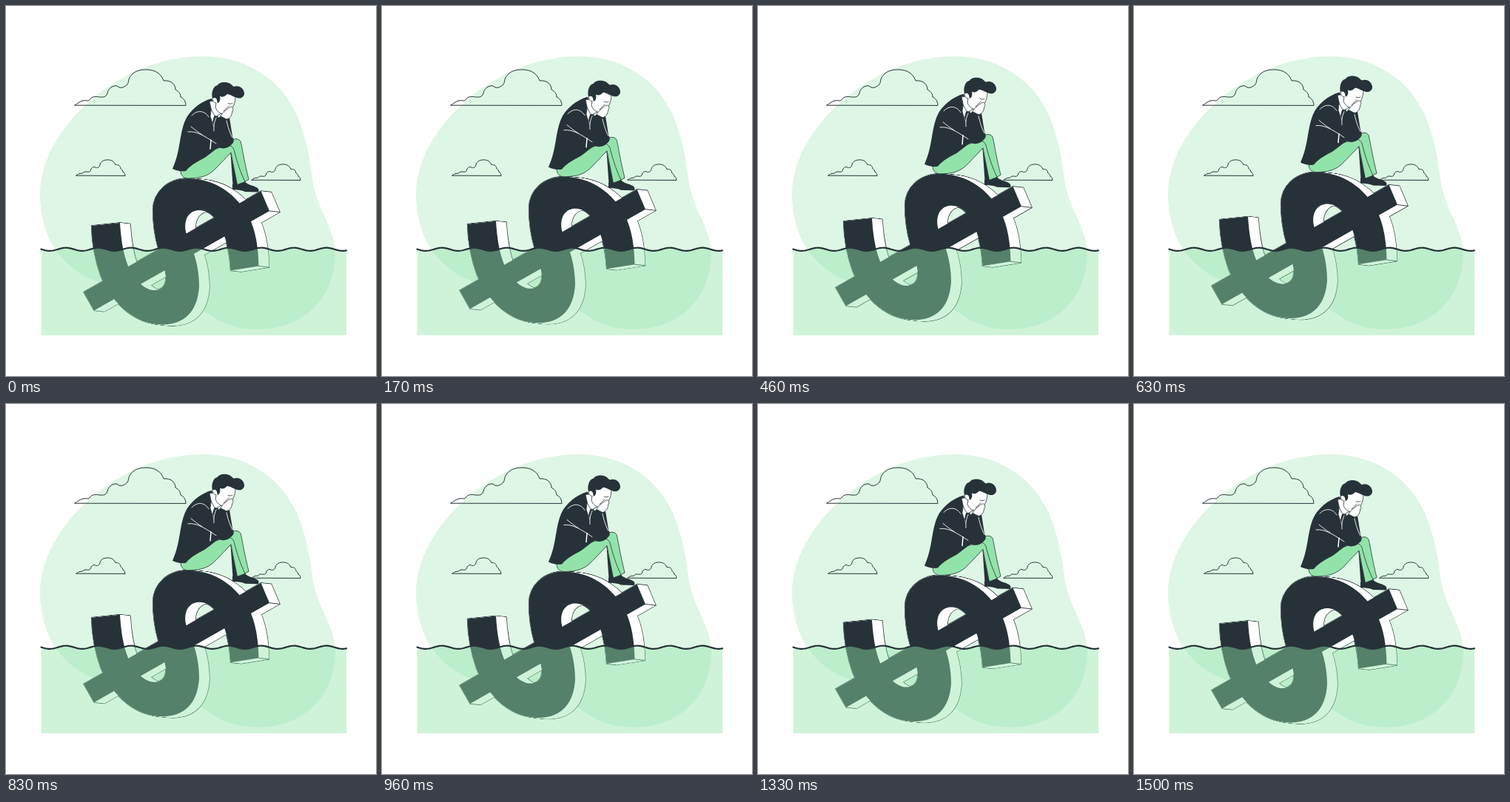
These frames come from a looping animation (500x500 px, 1.54 s). An HTML page:

```html
<!DOCTYPE html>
<html lang="en">
<head>
<meta charset="utf-8">
<title>Sinking dollar</title>
<style>
html, body { margin: 0; width: 100%; height: 100%; overflow: hidden; background: #fff; }
svg { display: block; width: 100vw; height: 100vh; }
.line { fill: none; stroke: #263238; stroke-linecap: round; stroke-linejoin: round; }
.pale { fill: none; stroke: #fff; stroke-linecap: round; stroke-linejoin: round; }
.dark { fill: #263238; }
.skin { fill: #fff; stroke: #263238; stroke-width: .8; stroke-linejoin: round; }
.cloth { fill: #92e3a9; stroke: #263238; stroke-width: .8; stroke-linejoin: round; }
</style>
</head>
<body>
<svg viewBox="0 0 500 500">
  <defs>
    <path id="cloud" vector-effect="non-scaling-stroke" d="M0 0C4 -2 6 -5 11 -6C15 -7 18 -5 20 -7C22 -12 29 -12 33 -11C38 -11 42 -10 44 -16C45 -23 52 -27 57 -26C62 -21 68 -25 71 -28C73 -31 72 -36 76 -40C81 -47 90 -48 97 -48C109 -48 117 -42 120 -33C129 -34 136 -29 136 -21C141 -18 143 -15 143 -11C148 -9 150 -4 150 0Z"/>
    <g id="dollar">
      <path d="M115.500 297L154 293C156 324 161 350 174 367C184 380 194 385 203 384C216 382 218 370 214 356C211 344 208 337 206 329C201 312 198.500 294 198.500 275C199 252 218 233 245 233C283 233 312 255 328 285C338 304 341 328 341.500 351.500L303.500 357.500C302 333 298 311 286 292C279 281 270 275.500 260 276C246 277 240 290 243 305C245 315 250 324 254 335C259 350 261 365 261 379C259 412 242 430 212 430.500C176 430.500 145 405 128 365C119 340 116 318 115.500 297Z"/>
      <path d="M104.800 386.500L344.500 250L356 277L119 411.500Z"/>
    </g>
  </defs>

  <path fill="#def6e5" d="M264 68C196 69 139 101 98 143C63 179 46 220 46 255C47 302 64 341 106 365C149 387 211 379 252 402C280 419 295 437 341 437C403 437 445 394 445 334C445 301 421 276 415 239C409 196 403 162 384 131C360 92 318 68 264 68Z"/>
  <g class="line" stroke-width="1">
    <use href="#cloud" transform="translate(93 134)"/>
    <use href="#cloud" transform="translate(95 229) scale(.44)"/>
    <use href="#cloud" transform="translate(332 235) scale(.44)"/>
  </g>

  <g id="float">
    <g id="edge" fill="#263238" stroke="#263238" stroke-width="1.300" stroke-linejoin="round"></g>
    <g id="side" fill="#fff"></g>
    <path class="line" stroke-width=".9" d="M356 277L370 278.500M341.500 351.500L355.500 353"/>
    <use href="#dollar" class="dark"/>

    <path class="dark" d="M306 241L323 237C326 242 334 242 340 246C342 248 342 251 340 251.500L323 251C317 248 312 249 306 248Z"/>
    <path class="dark" d="M303.500 199L313 241L306.500 242Z"/>
    <path class="cloth" d="M302 184C306 179 314 178 317 183C319 190 321 206 328 234.500L319 239C310 220 305 205 302 193Z"/>
    <path class="cloth" d="M236 222C236 228 239 233 246 233C262 233 274 230 284 219L304 198L312.500 241.500L323 237.500C317 225 313 213 309 198C308 191 304 187 297 189C281 193 261 202 247 209Z"/>

    <path class="dark" d="M278 125C263 129 248 141 242 155C234 174 236 196 225 220C231 223 238 224 243 223C250 214 262 209 270 204C277 199 282 194 288 191C293 194 301 192 305 187C309 184 308 180 306 176L302 151L294 146L287 151Z"/>
    <path class="skin" d="M275 129L283 128L291 145L280 152Z"/>
    <path class="skin" d="M277 140L283 150L281 165L276 149Z"/>
    <path class="dark" d="M281 149L284 148L285 155L282 164L279 157Z"/>
    <path class="skin" d="M281 121C278 124 279 131 284 131L283 137C285 142 289 146 295 146L302 142C308 137 310 130 310 121L301 114L286 120Z"/>
    <path class="skin" d="M290 149C293 143 297 141 302 137C306 135 308 139 306 142C305 148 303 152 298 153Z"/>
    <path class="line" stroke-width=".8" d="M294 142C297 140 299 137 301 135M300 131.500C302 132.500 304 132.500 306 131.500"/>
    <path class="dark" d="M279 125C277 117 280 108 286 107C288 103 296 102 301 104C304 105 306 108 308 109C315 106 322 112 322 118C322 123 317 126 312 124C308 123 304 120 299 119C296 122 293 124 289 122C290 126 289 131 285.500 131C286 126 283 122 279 125Z"/>
    <g class="pale" stroke-width=".9">
      <path d="M251 148C259 140 268 141 274 150M246 170C257 169 266 174 284 186M250 163C255 167 260 171 265 174M284 151C280 160 281 165 281 169M298 155C300 164 303 173 306 178"/>
      <path d="M277 181L276 193" stroke-width="1.500"/>
    </g>
  </g>

  <path id="sea" fill="#92e3a9" opacity=".44"/>
  <path id="wave" class="line" stroke-width="2.200"/>
</svg>
<script>
const $ = id => document.getElementById(id);
const LOOP = 1540, CYCLE = 1500, LEAD = 25, RISE = 10;
const DEPTH = [14, 1.5], STEPS = 16;

// Sweep the sign backwards to build its thickness.
for (const id of ["edge", "side"]) {
  let copies = "";
  for (let i = 0; i <= STEPS; i++) {
    const k = i / STEPS;
    copies += `<use href="#dollar" x="${DEPTH[0] * k}" y="${DEPTH[1] * k}"/>`;
  }
  $(id).innerHTML = copies;
}

const LEFT = 47.5, RIGHT = 460, CREST = 81, PERIOD = 44;
let surf = "";
for (let i = 0; i <= 206; i++) {
  const x = LEFT + (RIGHT - LEFT) * i / 206;
  const y = 328.8 - 2.1 * Math.cos((x - CREST) / PERIOD * 2 * Math.PI);
  surf += `${i ? "L" : "M"}${x.toFixed(2)} ${y.toFixed(2)}`;
}
$("wave").setAttribute("d", surf);
$("sea").setAttribute("d", `${surf}V445H${LEFT}Z`);

function lift(t) {
  const p = ((t + LEAD) % CYCLE) / CYCLE;
  return RISE * (1 - Math.abs(1 - 2 * p));
}

function draw(t) {
  $("float").setAttribute("transform", `translate(0 ${(lift(0) - lift(t)).toFixed(3)})`);
}

const start = performance.now();
function tick() {
  draw((performance.now() - start) % LOOP);
  requestAnimationFrame(tick);
}
draw(0);
tick();
</script>
</body>
</html>
```
